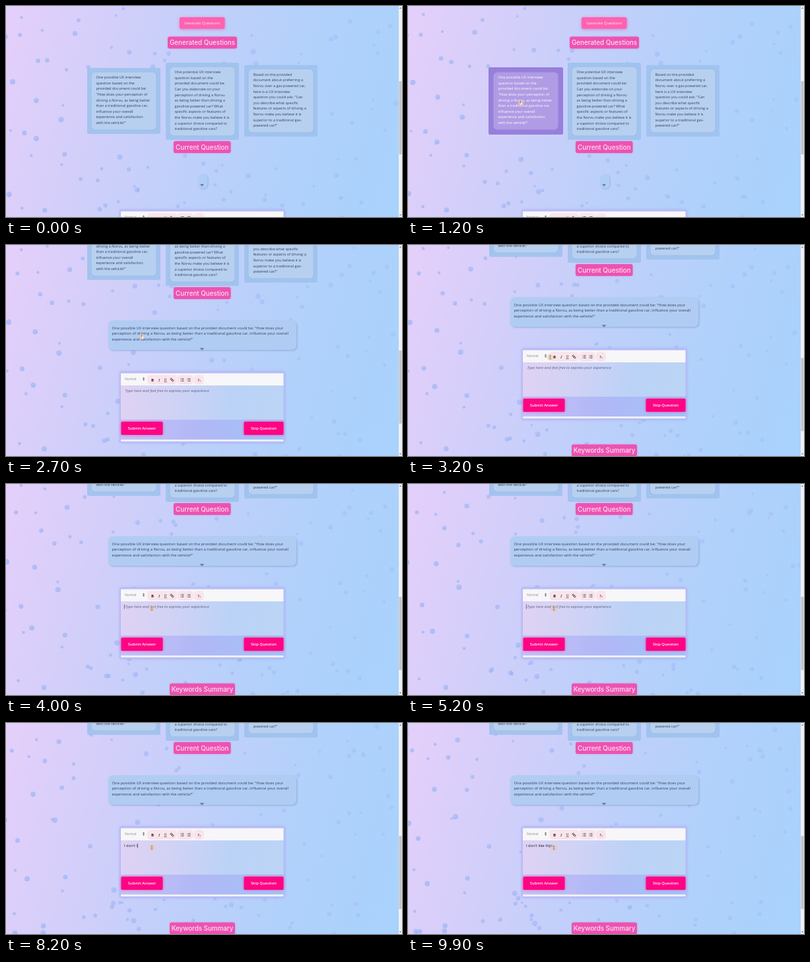
An HTML page with a canvas that plays this animation: 600x320 px, repeating every 10 s.

```html
<!DOCTYPE html>
<html lang="en">
<head>
<meta charset="utf-8">
<title>Interview questions</title>
<style>
html, body { margin: 0; width: 100%; height: 100%; overflow: hidden; background: #bccdf9; }
canvas { display: block; width: 600px; height: 320px; }
</style>
</head>
<body>
<canvas id="stage"></canvas>
<script>
const W = 600, H = 320, LOOP = 10000, STEP = 100;
const canvas = document.getElementById('stage');
const ratio = window.devicePixelRatio || 1;
canvas.width = W * ratio;
canvas.height = H * ratio;
const c = canvas.getContext('2d');
c.scale(ratio, ratio);

const BODY = '"Open Sans", "Noto Sans", sans-serif';
const HEAD = 'Inter, sans-serif';
const INK = '#33405f';
const OPENED = 2000;
const ANSWER = "I don't like thjis";

const cards = [
  { x: 123, y: 94, w: 111, h: 100, lines: [
    'One possible UX interview', 'question based on the', 'provided document could be:',
    '"How does your perception of', 'driving a Norvu, as being better', 'than a traditional gasoline car,',
    'influence your overall', 'experience and satisfaction', 'with the vehicle?"'] },
  { x: 242, y: 86, w: 111, h: 117, lines: [
    'One potential UX interview', 'question based on the', 'provided document could be:',
    'Can you elaborate on your', 'perception of driving a Norvu', 'as being better than driving a',
    'gasoline-powered car? What', 'specific aspects or features of', 'the Norvu make you believe it is',
    'a superior choice compared to', 'traditional gasoline cars?'] },
  { x: 361, y: 89.5, w: 111, h: 108.5, lines: [
    'Based on the provided', 'document about preferring a', 'Norvu over a gas-powered car,',
    'here is a UX interview', 'question you could ask: "Can', 'you describe what specific',
    'features or aspects of driving a', 'Norvu make you believe it is', 'superior to a traditional gas-',
    'powered car?"'] }
];
const question = [
  'One possible UX interview question based on the provided document could be: "How does your',
  'perception of driving a Norvu, as being better than a traditional gasoline car, influence your overall',
  'experience and satisfaction with the vehicle?"'
];

// Keyframes are [time, value, ...] rows
const scrollKeys = [[2200, 0], [2700, 141], [3200, 176]];
const typeKeys = [[5300, 0], [6500, 5], [8200, 9], [9900, 18]];
const pointerKeys = [[500, 225, 118], [1100, 171, 147], [2100, 171, 147], [2700, 206, 139], [3500, 221, 189]];

function along(keys, t, col = 1) {
  if (t <= keys[0][0]) return keys[0][col];
  for (let i = 1; i < keys.length; i++) {
    const a = keys[i - 1], b = keys[i];
    if (t <= b[0]) return a[col] + (b[col] - a[col]) * (t - a[0]) / (b[0] - a[0]);
  }
  return keys[keys.length - 1][col];
}

let seed = 41;
function rnd() {
  seed = (seed * 16807) % 2147483647;
  return seed / 2147483647;
}
const dots = Array.from({ length: 130 }, () => ({
  x: rnd() * 640, y: rnd() * 360, r: 1.9 + rnd() * 2.3,
  vx: (rnd() - 0.5) * 7, vy: (rnd() - 0.5) * 9
}));

function box(x, y, w, h, r, fill, shadow, blur = 0, dx = 0, dy = 0) {
  c.save();
  if (shadow) {
    c.shadowColor = shadow;
    c.shadowBlur = blur * ratio;
    c.shadowOffsetX = dx * ratio;
    c.shadowOffsetY = dy * ratio;
  }
  c.beginPath();
  c.roundRect(x, y, w, h, r);
  c.fillStyle = fill;
  c.fill();
  c.restore();
}

function text(s, x, y, size, color, align = 'left', family = BODY, style = '') {
  c.font = `${style} ${size}px ${family}`;
  c.textAlign = align;
  c.textBaseline = 'alphabetic';
  c.fillStyle = color;
  c.fillText(s, x, y);
}

function line(x1, y1, x2, y2, color, width = 0.8) {
  c.strokeStyle = color;
  c.lineWidth = width;
  c.beginPath();
  c.moveTo(x1, y1);
  c.lineTo(x2, y2);
  c.stroke();
}

function triangle(x, y, w, h, color) {
  c.fillStyle = color;
  c.beginPath();
  c.moveTo(x - w / 2, y);
  c.lineTo(x + w / 2, y);
  c.lineTo(x, y + h);
  c.fill();
}

function gradient(x1, y1, x2, y2, ...stops) {
  const g = c.createLinearGradient(x1, y1, x2, y2);
  stops.forEach((s, i) => g.addColorStop(i / (stops.length - 1), s));
  return g;
}

function background(t) {
  c.fillStyle = gradient(0, 90, 590, 250, '#e2cffa', '#d1cffa', '#bed0fa', '#b0d1fb', '#a9d2fc');
  c.fillRect(0, 0, W, H);
  for (const d of dots) {
    const x = (d.x + d.vx * t / 1000 + 640) % 640 - 20;
    const y = (d.y + d.vy * t / 1000 + 360) % 360 - 20;
    const k = Math.min(1, Math.max(0, x / W));
    const a = 0.62 - 0.24 * k;
    c.fillStyle = gradient(x - d.r, y - d.r, x + d.r, y + d.r,
      `rgba(${172 + 15 * k},${178 + 8 * k},243,${a})`, `rgba(${122 + 20 * k},${174 + 6 * k},243,${a})`);
    c.beginPath();
    c.arc(x, y, d.r, 0, 7);
    c.fill();
  }
}

function badge(s, x, y, w) {
  box(x, y, w, 18, 3, '#ec53b1', 'rgba(230,90,190,.45)', 3);
  text(s, x + w / 2, y + 12.5, 9.8, '#ffdff3', 'center', HEAD, '500');
}

function card({ x, y, w, h, lines }, hover) {
  const g = hover ? 1 : 0;
  box(x - g, y - g, w + 2 * g, h + 2 * g, 2, hover ? '#987fdc' : 'rgba(159,194,238,.9)');
  box(x + 6.5, y + 6.5, w - 13, h - 13, 6, hover ? '#b09ce4' : '#b8d0f0', 'rgba(120,150,210,.35)', 2);
  lines.forEach((s, i) => text(s, x + 13.4, y + 16.2 + i * 8.6, 5.6, hover ? '#fff' : INK));
}

function questionBox(open) {
  const shade = 'rgba(105,140,200,.5)';
  if (open) {
    box(155, 255.5, 285, 44.5, 7, '#b1ccf2', shade, 3, 1.2, 1.2);
    question.forEach((s, i) => text(s, 160.5, 268.6 + i * 8.5, 5.85, INK));
    triangle(297, 297, 7, 4, '#6d84ad');
  } else {
    box(291.5, 255, 14, 22, 7, '#b0cdf5', shade, 2.5, 0.8, 0.8);
    triangle(297, 270, 6, 4, '#6a83ad');
  }
}

function button(s, x, y, w) {
  box(x, y, w, 20, 1.5, '#ff0583', 'rgba(255,20,140,.6)', 4);
  text(s, x + w / 2, y + 12, 5.8, '#fff', 'center', BODY, '600');
}

function listIcon(x, y) {
  for (let i = -2; i <= 2; i += 2) {
    line(x - 2.5, y + i, x - 1.7, y + i, '#333', 0.8);
    line(x - 0.9, y + i, x + 2.5, y + i, '#333', 0.7);
  }
}

function toolbar(y) {
  text('Normal', 180, y + 10.6, 5, '#8a8a94');
  triangle(208.5, y + 8, 3, -2, '#444');
  triangle(208.5, y + 9.2, 3, 2, '#444');
  for (const [x, w] of [[216, 41], [261, 21], [286.5, 11.5]])
    box(x, y + 4.5, w, 10.5, 2, '#f9e6ec', 'rgba(255,130,170,.6)', 3);
  const ty = y + 12.2;
  text('B', 222, ty, 6, '#222', 'center', BODY, 'bold');
  text('I', 232, ty, 6, '#222', 'center', '"Noto Serif", serif', 'italic');
  text('U', 241.5, ty - 0.4, 5.6, '#222', 'center');
  line(239.4, ty + 0.8, 243.6, ty + 0.8, '#222', 0.6);
  c.save();
  c.translate(251.5, y + 10);
  c.rotate(Math.PI / 4);
  c.strokeStyle = '#222';
  c.lineWidth = 0.8;
  c.strokeRect(-2.8, -1, 2.6, 2);
  c.strokeRect(0.2, -1, 2.6, 2);
  c.restore();
  listIcon(267, y + 10);
  listIcon(277, y + 10);
  text('T', 291.4, ty, 5.6, '#222', 'center', BODY, 'italic');
  text('x', 294, ty + 0.4, 3.6, '#222', 'center');
}

function editor(y, t) {
  box(172.5, y - 2.5, 250, 108, 2, '#b9baf5', 'rgba(150,140,238,.5)', 4);
  c.fillStyle = gradient(174, 0, 421, 0, '#c5c0f6', '#b0b8f6', '#a2c3f8');
  c.fillRect(174, y, 247, 104);
  c.fillStyle = '#f7f6f8';
  c.fillRect(174, y, 246.5, 18.5);
  c.fillStyle = gradient(174, y + 18, 421, y + 60, '#e0d2f3', '#d0d2f5', '#bbd2f7', '#bbd5f5');
  c.fillRect(174, y + 18.5, 246.5, 52);
  c.fillStyle = '#eef0f7';
  c.fillRect(174, y + 100.5, 246.5, 3);
  toolbar(y);

  const n = Math.floor(along(typeKeys, t) + 1e-6);
  const typed = ANSWER.slice(0, n);
  const base = y + 28.6;
  if (n) text(typed, 179, base, 5.8, '#1c2030');
  else text('Type here and feel free to express your experience', 180.5, base, 5.85, '#59617e', 'left', BODY, 'italic');
  const blink = n ? t < 9700 : t > 3600 && t % 1000 < 500;
  if (blink) {
    const x = 179.4 + (n ? c.measureText(typed).width : 0);
    line(x, base - 5.4, x, base + 1.4, '#222', 0.6);
  }
  button('Submit Answer', 174.5, y + 73.5, 63);
  button('Skip Question', 360.5, y + 73.5, 60);
}

function scrollbar(s) {
  c.fillStyle = '#eef0f4';
  c.fillRect(595, 0, 5, H);
  c.fillStyle = '#c2c3c7';
  c.fillRect(595.5, 114 + s * 0.325, 4, 111);
  triangle(597.5, 4, 3, -2, '#777');
  triangle(597.5, 316, 3, 2, '#777');
}

function pointer(t) {
  if (t < 500) return;
  const x = along(pointerKeys, t), y = along(pointerKeys, t, 2);
  c.fillStyle = 'rgba(238,196,160,.6)';
  c.beginPath();
  c.arc(x, y, 4.6, 0, 7);
  c.fill();
  if (t < 3000) {
    box(x - 1.2, y - 1, 3.2, 3.6, 1, '#f7f2ec');
    line(x - 0.4, y - 3, x - 0.4, y + 1, '#75655d', 0.8);
  } else {
    line(x, y - 2.6, x, y + 2.6, '#6f6258', 0.7);
    line(x - 1.2, y - 2.6, x + 1.2, y - 2.6, '#6f6258', 0.5);
    line(x - 1.2, y + 2.6, x + 1.2, y + 2.6, '#6f6258', 0.5);
  }
}

function draw(t) {
  const s = along(scrollKeys, t);
  const open = t >= OPENED;
  const shift = open ? 0 : -24;
  background(t);
  c.save();
  c.translate(0, -s);
  box(263, 17, 68.5, 17.5, 2.5, '#ff62b0', 'rgba(235,70,160,.55)', 5, 0, 1);
  text('Generate Questions', 297.3, 28.2, 5.8, '#fff0f8', 'center');
  badge('Generated Questions', 245, 46.5, 105);
  cards.forEach((k, i) => card(k, i === 0 && t >= 900 && t < 2300));
  badge('Current Question', 254, 205, 86.5);
  questionBox(open);
  editor(335.5 + shift, t);
  badge('Keywords Summary', 248, 478.5 + shift, 99);
  c.restore();
  scrollbar(s);
  pointer(t);
}

const start = performance.now();
function tick() {
  const t = (performance.now() - start) % LOOP;
  draw(Math.floor(t / STEP) * STEP);
  requestAnimationFrame(tick);
}
tick();
</script>
</body>
</html>
```
